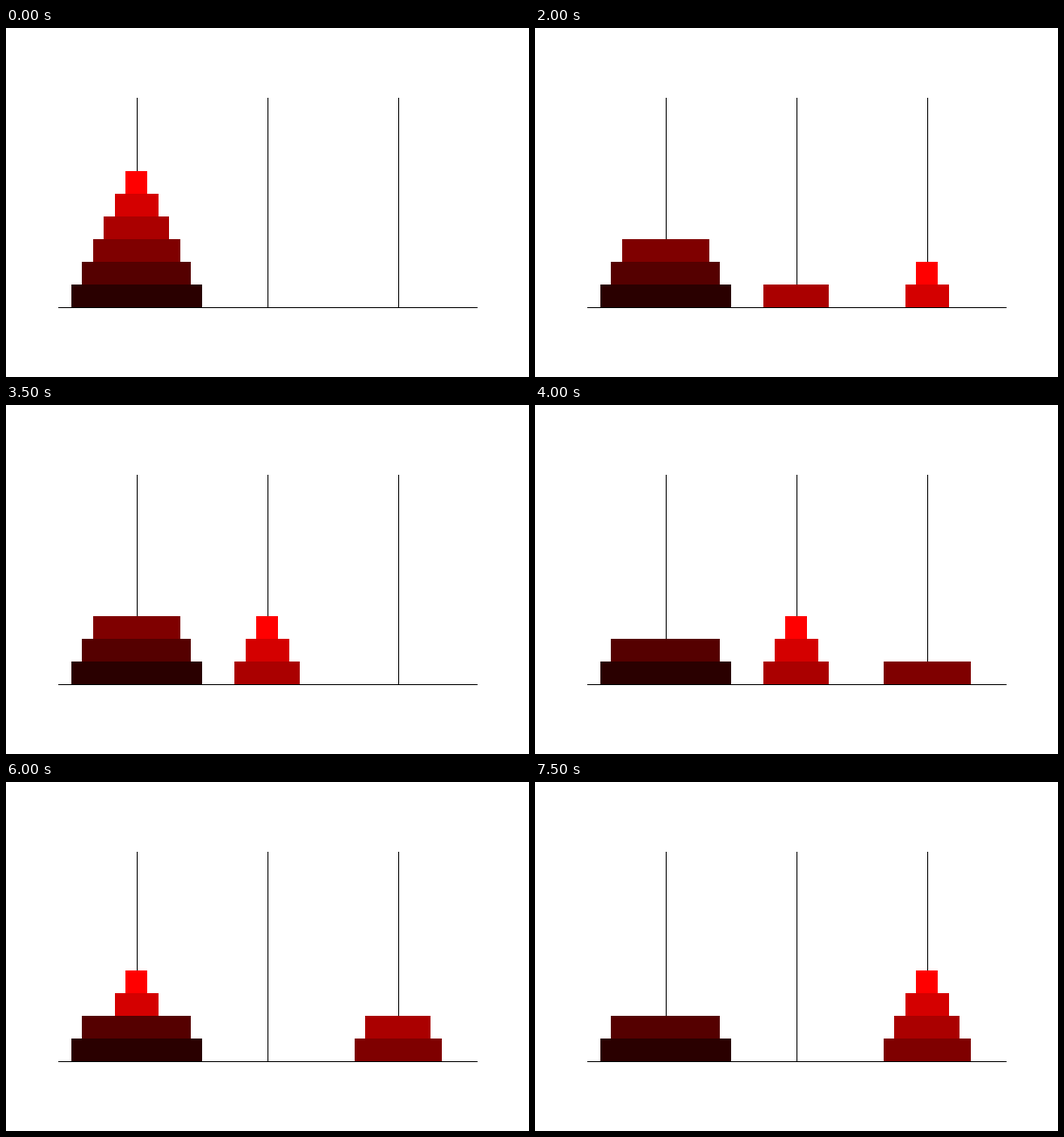
An HTML page that plays this animation: 600 px wide and 400 px high, repeating every 8 s.

```html
<!DOCTYPE html>
<html lang="en">
<head>
<meta charset="utf-8">
<title>Tower of Hanoi</title>
<style>
  html, body { margin: 0; width: 100%; height: 100%; overflow: hidden; background: #fff; }
  svg { display: block; }
</style>
</head>
<body>
<svg id="stage" width="600" height="400" viewBox="0 0 600 400" shape-rendering="crispEdges"></svg>
<script>
const DISKS = 6, LOOP = 8000, STEP = 500;
const FLOOR = 320, DISK_HEIGHT = 26, PEG_GAP = 150;
const stage = document.getElementById('stage');

function addRect(x, y, width, height, fill) {
  const rect = document.createElementNS('http://www.w3.org/2000/svg', 'rect');
  const attrs = { x, y, width, height, fill };
  for (const name in attrs) rect.setAttribute(name, attrs[name]);
  stage.append(rect);
  return rect;
}

for (let peg = 1; peg <= 3; peg++) addRect(peg * PEG_GAP, 80, 1, 240, '#000');
addRect(60, FLOOR, 481, 1, '#000');

const disks = Array.from({ length: DISKS }, (_, i) => {
  const red = Math.floor(255 * (DISKS - i) / DISKS);
  return addRect(0, 0, 25 * (i + 1), DISK_HEIGHT, `rgb(${red},0,0)`);
});

// Disk k moves every 2^k steps; odd and even sizes cycle in opposite directions.
function pegOf(k, moves) {
  const count = Math.floor((moves + 2 ** (k - 1)) / 2 ** k);
  return (k % 2 ? count : 2 * count) % 3;
}

function draw(time) {
  const moves = Math.floor((time % LOOP) / STEP);
  const heights = [0, 0, 0];
  for (let k = DISKS; k >= 1; k--) {
    const peg = pegOf(k, moves);
    const disk = disks[k - 1];
    disk.setAttribute('x', Math.floor((peg + 1) * PEG_GAP - 12.5 * k));
    disk.setAttribute('y', FLOOR - DISK_HEIGHT * ++heights[peg]);
  }
}

const start = performance.now();
function tick() {
  draw(performance.now() - start);
  requestAnimationFrame(tick);
}
tick();
</script>
</body>
</html>
```
